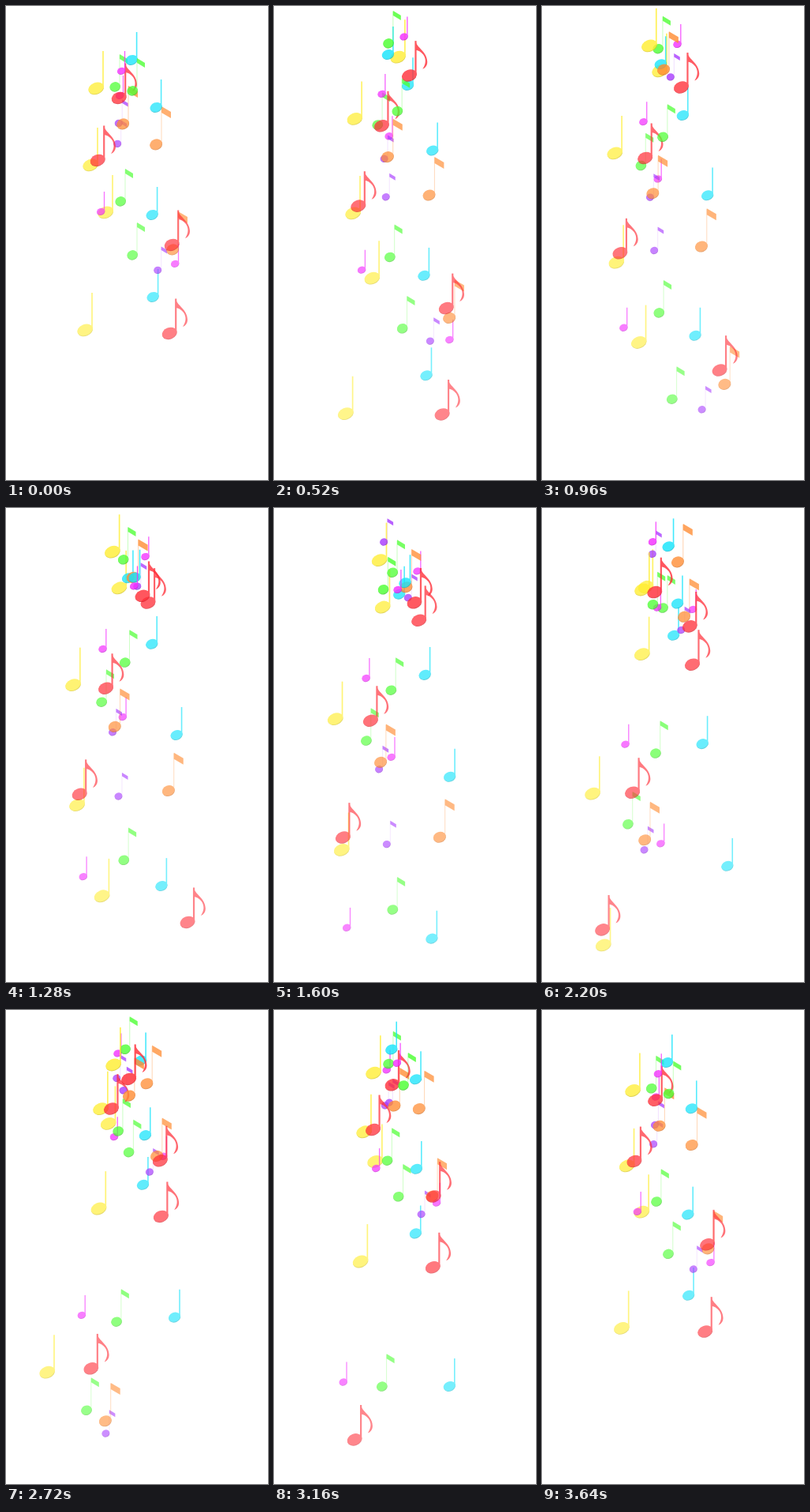
An HTML page for the animation above (3.68 s loop, 332 px wide and 600 px high).

```html
<!DOCTYPE html>
<html lang="en">
<head>
<meta charset="utf-8">
<title>Falling notes</title>
<style>
html, body { margin: 0; width: 100%; height: 100%; overflow: hidden; background: #fff; }
svg { display: block; width: 332px; height: 600px; }
</style>
</head>
<body>
<svg id="stage" viewBox="0 0 332 600"></svg>
<script>
const LOOP = 3.68, STEP = 0.04, LIFE = 4.2;
const FIRST = -3.66, GAP = 0.122, GRAVITY = 51;

// Emitted in this order, over and over. The head sits at the origin of each note.
const KINDS = [
  { color: '#ffee32', edge: '#d6c41e', rx: 10, ry: 7, stem: [9, -47, 1.7] },
  { color: '#ff2d37', edge: '#d8222c', rx: 9.6, ry: 6.9, stem: [8.2, -43.5, 2.2],
    flag: 'M8 -44C9 -35 23 -30 23 -17C23 -12 20 -9 17 -8C21 -14 22 -20 18 -26C15 -30 11 -32 8 -32Z' },
  { color: '#14e4fc', edge: '#10b8cc', rx: 7.7, ry: 5.8, stem: [6.6, -35, 1.6] },
  { color: '#f42dff', edge: '#c81ed6', rx: 5.2, ry: 4.1, stem: [4.5, -25, 1.3] },
  { color: '#4cff32', edge: '#3cc828', rx: 6.8, ry: 5.7, stem: [6, -40, 0.4], flag: bar(6, 16, -41, -35, 6) },
  { color: '#a83cff', edge: '#8828d6', rx: 4.9, ry: 4.2, stem: [4.7, -29, 0.2], flag: bar(4.7, 12.2, -29.5, -25, 4.5) },
  { color: '#ff8c32', edge: '#d67024', rx: 8, ry: 6.4, stem: [7, -47, 0.5], flag: bar(7, 19, -48, -41, 8) }
];

// Where each note is at loop time 0, and its sideways drift: x, y, px/s.
const NOTES = [
  [100, 410, -18], [207, 414, 11.3], [186, 368, 13.2], [214, 326, 15.7], [160, 315, 4.8],
  [192, 334, 10.8], [211, 308, 21], [126, 261, -3.6], [210, 302, 15.5], [185, 264, 9.2],
  [120, 260, -17.5], [145, 247, 3.2], [141, 174, 1], [190, 175, 12.3], [107, 201, -13.4],
  [116, 195, -18], [190, 128, 20.3], [144, 113, 2.8], [138, 102, -13.3], [142.5, 148, -6],
  [148, 149, -8.2], [114, 104, -22.8], [143, 116, -13], [159, 68, 20], [146, 82, -18.5],
  [160, 107, -7.4]
];

function bar(x1, x2, y1, y2, h) {
  return `M${x1} ${y1}L${x2} ${y2}V${y2 + h}L${x1} ${y1 + h}Z`;
}

function draw({ color, edge, rx, ry, stem: [x, top, w], flag }) {
  const head = `rx="${rx}" ry="${ry}" transform="rotate(-22)"`;
  return `<g transform="translate(.4 .8)"><ellipse ${head} fill="${edge}"/></g>` +
    `<ellipse ${head} fill="${color}"/>` +
    `<path d="M${x} 0V${top}" stroke="${color}" stroke-width="${w}"/>` +
    (flag ? `<path d="${flag}" fill="${color}"/>` : '');
}

const stage = document.getElementById('stage');
const sprites = [];

// Lives overlap the loop, so a fading note and its successor can share the stage.
for (const shift of [0, LOOP]) {
  NOTES.forEach(([x, y, vx], i) => {
    const el = document.createElementNS('http://www.w3.org/2000/svg', 'g');
    el.innerHTML = draw(KINDS[i % KINDS.length]);
    stage.append(el);
    sprites.push({ el, x, y, vx, vy: 190 - 6.15 * i, birth: FIRST + GAP * i, shift });
  });
}

function render(time) {
  for (const s of sprites) {
    const t = time - s.shift, age = t - s.birth;
    const alive = age >= 0 && age < LIFE;
    s.el.style.display = alive ? '' : 'none';
    if (!alive) continue;
    const x = s.x + s.vx * t;
    const y = s.y + s.vy * t + GRAVITY / 2 * t * t;
    s.el.setAttribute('transform', `translate(${x.toFixed(2)} ${y.toFixed(2)})`);
    s.el.setAttribute('opacity', (0.82 - 0.06 * age).toFixed(3));
  }
}

const start = performance.now();
function tick() {
  const time = (performance.now() - start) / 1000 % LOOP;
  render(Math.floor(time / STEP + 1e-6) * STEP);
  requestAnimationFrame(tick);
}
tick();
</script>
</body>
</html>
```
